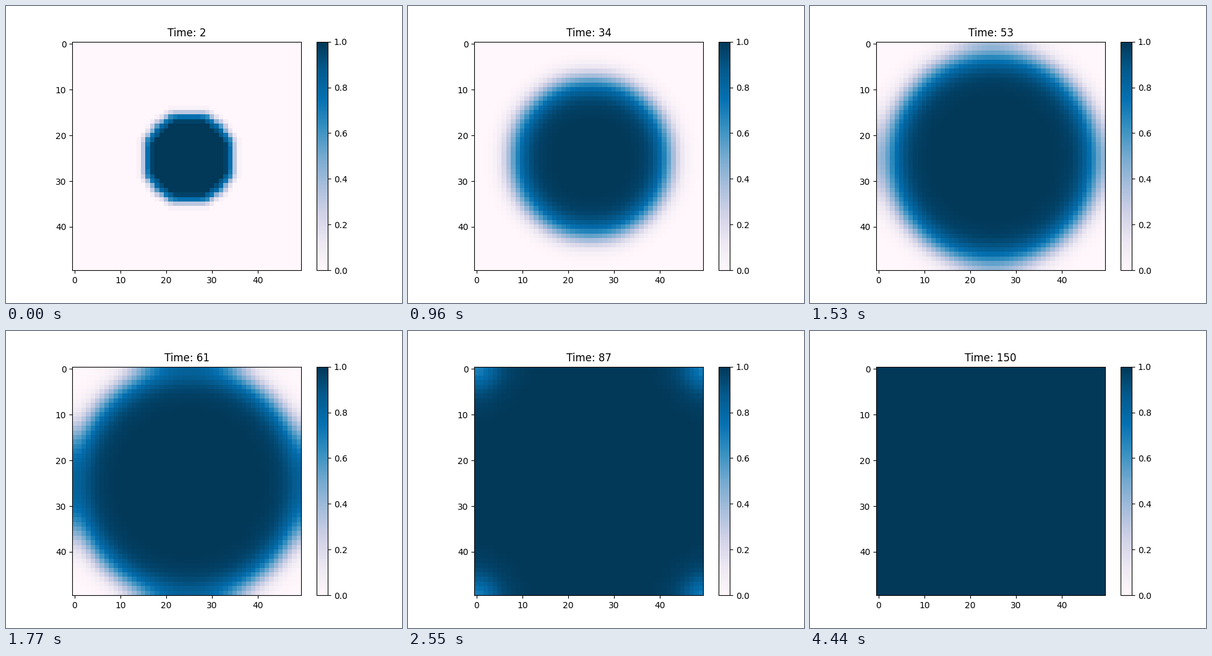
Recreate the animation shown at these times as a matplotlib script. Size 640 px wide and 480 px high, loop 4470 ms.

```python
import numpy as np
import matplotlib.pyplot as plt
from matplotlib.animation import FuncAnimation

SIZE = 50
RADIUS = 10
DIFFUSION = 0.2
GROWTH = 0.2
FIRST, LAST = 2, 150


def laplacian(u):
    """Five-point stencil on a wrapped grid."""
    return (np.roll(u, 1, 0) + np.roll(u, -1, 0)
            + np.roll(u, 1, 1) + np.roll(u, -1, 1) - 4 * u)


def step(u):
    """Spread to the neighbours plus logistic growth."""
    return u + DIFFUSION * laplacian(u) + GROWTH * u * (1 - u)


def simulate():
    rows, cols = np.indices((SIZE, SIZE)) - SIZE // 2
    states = [(rows**2 + cols**2 < RADIUS**2).astype(float)]
    for _ in range(LAST):
        states.append(step(states[-1]))
    return states


states = simulate()

fig, ax = plt.subplots(figsize=(6.4, 4.8), dpi=100)
image = ax.imshow(states[FIRST], cmap="PuBu", vmin=0, vmax=1)
fig.colorbar(image, ax=ax)
title = ax.set_title(f"Time: {FIRST}")


def update(frame):
    time = FIRST + frame
    image.set_data(states[time])
    title.set_text(f"Time: {time}")
    return image, title


anim = FuncAnimation(fig, update, frames=LAST - FIRST + 1, interval=30,
                     repeat=True, repeat_delay=0, blit=False)

plt.show()
```
